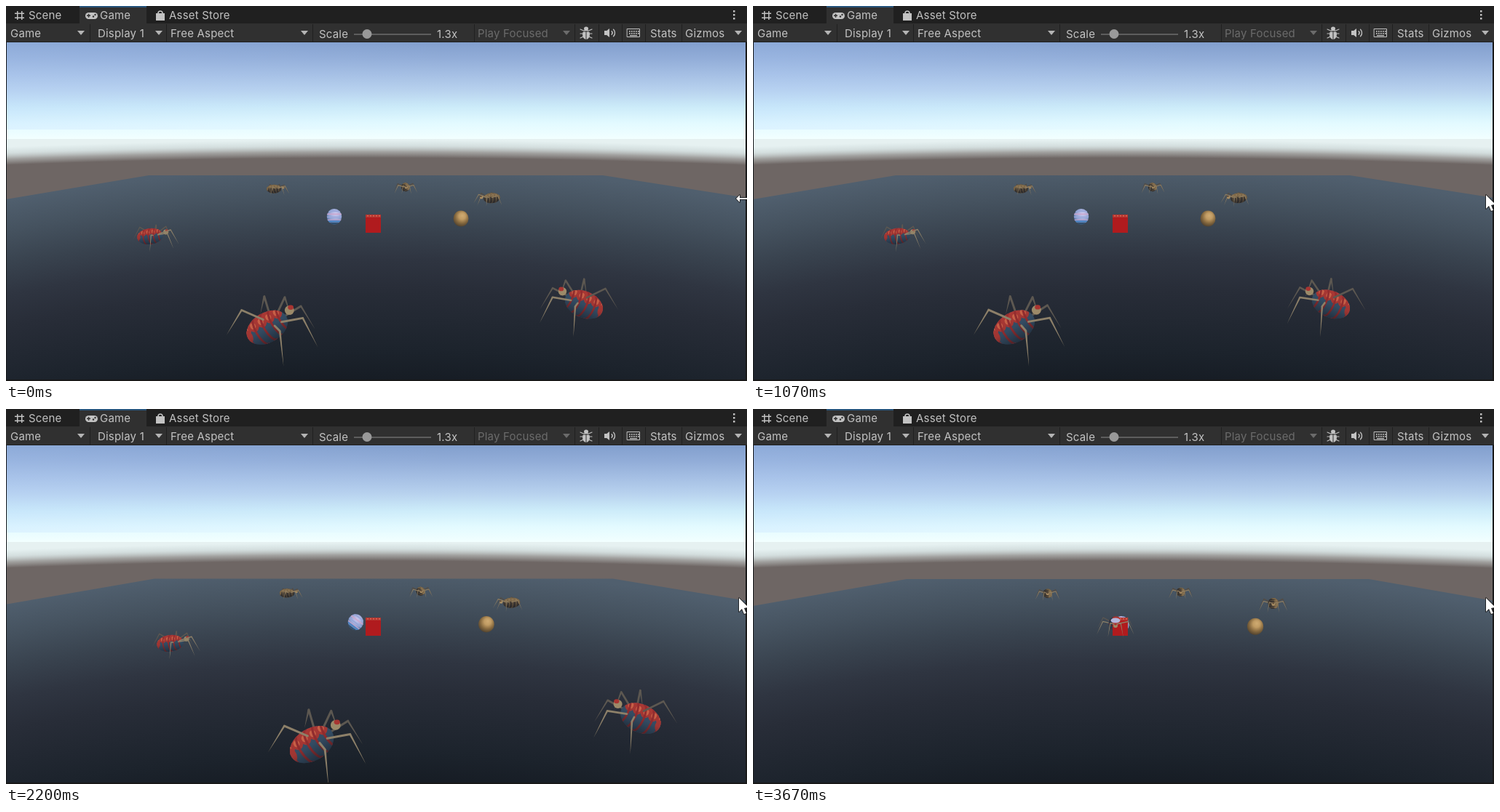
Animation of 1018x516 px, one loop 3.74 s. Source, as an HTML page with a canvas:

```html
<!DOCTYPE html>
<html lang="en">
<head>
<meta charset="utf-8">
<title>Game view</title>
<style>
html, body { margin: 0; width: 100%; height: 100%; overflow: hidden; background: #191919; }
canvas { display: block; }
</style>
</head>
<body>
<canvas id="stage" width="1018" height="516"></canvas>
<script>
const LOOP = 3740, STEP = 200 / 3, CUT = 2400, MIDDLE = 505, HORIZON = 175;
const INK = '#c2c2c2', DIM = '#6b6b6b', PANEL = '#303030', DARK = '#202020';
const { PI, sin, cos, hypot, atan2 } = Math;
const ctx = document.getElementById('stage').getContext('2d');

const lerp = (a, b, k) => a + (b - a) * k;
function ease(t, from, to) {
  const k = Math.min(1, Math.max(0, (t - from) / (to - from)));
  return k * k * (3 - 2 * k);
}

function rect(x, y, w, h, color) {
  ctx.fillStyle = color;
  ctx.fillRect(x, y, w, h);
}
function oval(x, y, rx, ry, color, turn = 0) {
  ctx.beginPath();
  ctx.ellipse(x, y, rx, ry, turn, 0, PI * 2);
  ctx.fillStyle = color;
  ctx.fill();
}
function arc(x, y, rx, ry, from, to, color, width) {
  ctx.beginPath();
  ctx.ellipse(x, y, rx, ry, 0, from, to);
  ctx.strokeStyle = color;
  ctx.lineWidth = width;
  ctx.stroke();
}
function trace(pts) {
  ctx.beginPath();
  for (const [x, y] of pts) ctx.lineTo(x, y);
}
function poly(pts, color) {
  trace(pts);
  ctx.closePath();
  ctx.fillStyle = color;
  ctx.fill();
}
function line(pts, color, width) {
  trace(pts);
  ctx.strokeStyle = color;
  ctx.lineWidth = width;
  ctx.stroke();
}
function fill(gradient, colors) {
  colors.forEach((c, i) => gradient.addColorStop(i / (colors.length - 1), c));
  return gradient;
}
// Evenly spaced colours from top to bottom, along wide arcs.
function arcs(radius, top, bottom, colors) {
  const cy = bottom + radius;
  return fill(ctx.createRadialGradient(MIDDLE, cy, cy - top, MIDDLE, cy, radius), colors);
}

const sky = fill(ctx.createLinearGradient(0, 50, 0, 183),
  ['#829fcd', '#92add8', '#a5bfe4', '#b8d2ee', '#ccebf9', '#e2faff', '#f2ffff']);
const glow = fill(ctx.createLinearGradient(0, 50, 600, 120), ['rgba(180,210,255,.22)', 'rgba(180,210,255,0)']);
const haze = arcs(13000, 184, 209, ['rgba(190,205,206,0)', 'rgba(190,200,200,.45)', 'rgba(150,148,146,.85)', '#6e6664']);
const ground = arcs(2400, 220, 516, ['#505f6e', '#45525f', '#39434f', '#2f3541', '#282d38', '#222832', '#1c232c', '#161c24']);

const RED = { base: '#365068', band: '#962d2f', back: '#aa3834', shine: '#cd6248', leg: '#8d8069', dim: '#5d5851', head: '#9c8a69', face: '#a83531' };
const TAN = { base: '#413a34', band: '#806b4c', back: '#7d6849', shine: '#a08560', leg: '#8f7d60', dim: '#554c42', head: '#a88d63', face: '#5a4838' };

// Ground point and heading; size and tilt follow from the distance to the horizon.
const far = [[371, 258, -.15], [549, 256, 1.5], [664, 272, 2.8]];
const near = [[203, 328, -.4], [787, 427, 3.85], [366, 460, -.8]];

// Camera slide: things low on the stage move furthest.
function place(x, y, move) {
  const u = y - HORIZON;
  return [x + move * u * (.46 + .0004 * (x - MIDDLE)), y + move * u * u * .00045];
}

function drawBody(x, y, rx, ry, turn, skin) {
  ctx.save();
  ctx.translate(x, y);
  // Keep the back upward when the body points left.
  const flip = cos(turn) < 0 ? -1 : 1;
  ctx.scale(flip, 1);
  ctx.rotate(atan2(sin(turn), cos(turn) * flip));
  oval(0, 0, rx, ry, skin.base);
  ctx.clip();
  for (let i = 2; i >= -2; i--) {
    const cx = i * rx * .4;
    oval(cx - rx * .1, -ry * .62, rx * .25, ry * .5, skin.back);
    oval(cx - rx * .13, -ry * .55, rx * .13, ry * .22, skin.shine);
    arc(cx + rx * .1, 0, rx * .24, ry, PI / 2, PI * 1.5, skin.band, rx * .1);
  }
  oval(-rx, -ry * .1, rx * .25, ry * .5, skin.back);
  const shade = fill(ctx.createLinearGradient(0, -ry, 0, ry), ['rgba(18,22,30,0)', 'rgba(18,22,30,.08)', 'rgba(18,22,30,.55)']);
  rect(-rx, -ry, rx * 2, ry * 2, shade);
  ctx.restore();
}

function drawSpider(x, y, heading, skin, t, inside) {
  const size = .226 * (y - HORIZON), tilt = (y - HORIZON) / 500;
  const breath = .01 * sin(t / 420), width = Math.max(1.2, size * .045);
  // Point at an angle, radius and height around the spider.
  const point = (a, r, z) => [x + size * r * cos(a), y + size * (r * sin(a) * tilt - z)];
  const drawLeg = a => {
    const knee = point(a, .67, .57 + breath), foot = point(a, 1, 0);
    const color = sin(a) < -.2 ? skin.dim : skin.leg;
    line([point(a, .2, .42 + breath), knee], color, width);
    poly([[knee[0] - width / 2, knee[1]], [knee[0] + width / 2, knee[1]], foot], color);
  };
  const drawHead = () => {
    const [hx, hy] = point(heading, .52, .43 + breath), r = size * .1;
    oval(hx, hy, r, r, skin.head);
    oval(hx + r * .4 * cos(heading), hy - r * .6, r * .6, r * .5, skin.face);
  };
  const legs = [.35, 1.05, 2.15].flatMap((a, i) => [-1, 1].map(side =>
    heading + side * a + .02 * sin(t / 300 + i * 2 + side))).sort((a, b) => sin(a) - sin(b));
  const away = sin(heading) < .2;

  ctx.lineCap = ctx.lineJoin = 'round';
  legs.slice(0, 3).forEach(drawLeg);
  if (away) drawHead();
  const ax = cos(heading), ay = sin(heading) * tilt;
  const long = size * Math.sqrt(.1 + .19 * (ax * ax + ay * ay));
  drawBody(...point(heading, -.16, .34 + breath), long, size * .32, atan2(ay, ax), skin);
  if (inside) inside();
  legs.slice(3).forEach(drawLeg);
  if (!away) drawHead();
}

function ball(x, y, colors, roll) {
  const r = .082 * (y - HORIZON), cy = y - r;
  ctx.save();
  ctx.translate(x, cy);
  oval(0, 0, r, r * 1.04, fill(ctx.createRadialGradient(r * .2, -r * .4, 0, r * .1, -r * .2, r * 1.3), colors));
  ctx.clip();
  if (roll !== undefined) {
    ctx.rotate(roll);
    for (let i = -2; i < 2; i++) rect(-r, i * r * .4, r * 2, r * .14, i % 2 ? '#cfa5cb' : '#95a6db');
    rect(-r, r * .5, r * 2, r * .25, '#4f85c2');
    rect(-r, r * .8, r * 2, r * .4, '#30506f');
  }
  ctx.restore();
}

function cube() {
  rect(494, 287, 21, 25, '#b01b1e');
  rect(494, 287, 21, 4, '#b7352f');
  for (let x = 496; x < 514; x += 4) rect(x, 288, 2, 1.5, '#cf6a58');
}

function scene(t) {
  const move = ease(t, 1450, 2880), turn = ease(t, 2200, 3100);
  const at = (a, b) => lerp(a, b, move);
  const spider = ([x, y, heading], skin) => drawSpider(...place(x, y, move), lerp(heading, PI / 2, turn), skin, t);

  rect(0, 50, 1018, 140, sky);
  rect(0, 183, 1018, 60, '#e6f1f1');
  rect(0, 50, 1018, 120, glow);
  rect(0, 180, 1018, 100, haze);
  poly([[0, at(266, 271)], [at(196, 211), at(233, 234)], [at(820, 846), at(233, 234)],
    [1018, 264], [1018, 516], [0, 516]], ground);

  far.forEach(s => spider(s, TAN));
  ball(...place(625, 303, move), ['#cfab72', '#c09b63', '#86693f', '#4c3f2e']);
  ball(...place(451, 300, move), ['#c9c7ec', '#b3b7e2', '#8fa0cf', '#4a6a98'], move * 1.2);
  if (t < CUT) {
    cube();
    near.forEach(s => spider(s, RED));
  } else {
    const spin = ease(t, CUT, 3500);
    drawSpider(lerp(494, 498, spin), 307, spin * PI / 2, RED, t, () => {
      cube();
      oval(lerp(491, 498, spin), 291, 6.5, 3.5, '#b4b6dc');
    });
  }
  rect(0, 50, 1, 466, '#17191c');
  rect(1016, 50, 2, 466, '#191919');
  rect(0, 514, 1018, 2, '#191919');
}

function text(str, x, y, color = INK) {
  ctx.font = '15px Inter, "Open Sans", sans-serif';
  ctx.letterSpacing = '.2px';
  ctx.fillStyle = color;
  ctx.fillText(str, x, y);
}
const drop = (x, color = '#b4b4b4') => poly([[x - 5, 34], [x + 5, 34], [x, 40]], color);

function tabs() {
  rect(0, 0, 1018, 24, DARK);
  rect(101, 0, 92, 24, PANEL);
  rect(101, 0, 92, 2, '#2a567d');
  text('Scene', 31, 18);
  text('Game', 129, 18);
  text('Asset Store', 224, 18);
  for (const y of [6, 11, 16]) rect(999, y, 2.5, 2.5, INK);
  // Grid, gamepad, bag
  for (const d of [0, 6]) {
    rect(15 + d, 7, 1.5, 12, INK);
    rect(12, 9.5 + d, 13, 1.5, INK);
  }
  line([[113.5, 13.5], [121.5, 13.5]], INK, 9);
  rect(111, 12.5, 5, 1.5, PANEL);
  rect(112.8, 10.8, 1.5, 5, PANEL);
  for (const d of [0, 2.5]) oval(120 + d, 14.5 - d, 1.2, 1.2, PANEL);
  rect(206, 10, 12, 10, INK);
  arc(212, 10, 3, 3, PI, PI * 2, INK, 1.6);
}

function toolbar() {
  rect(0, 24, 1018, 26, PANEL);
  rect(0, 49, 1018, 1, DARK);
  for (const x of [115, 220, 421, 643, 781, 814, 846, 878, 928]) rect(x, 25, 1, 24, DARK);
  text('Game', 6, 43);
  text('Display 1', 126, 43);
  text('Free Aspect', 226, 43);
  text('Scale', 430, 44);
  text('1.3x', 592, 44);
  text('Play Focused', 648, 43, DIM);
  text('Stats', 885, 43);
  text('Gizmos', 933, 43);
  for (const x of [103, 210, 410, 1006]) drop(x);
  drop(770, DIM);
  rect(478, 38, 106, 2, '#5e5e5e');
  oval(496, 38.5, 6.5, 6.5, '#999');
  // Bug, speaker, keyboard
  for (const d of [-5, 0, 5]) line([[789, 38 + d * 1.2], [797, 38 + d * .5], [805, 38 + d * 1.2]], INK, 1.2);
  oval(797, 39, 5, 7, INK);
  oval(797, 31, 3, 2.5, INK);
  rect(796.5, 34, 1, 12, PANEL);
  rect(792, 34.5, 10, 1, PANEL);
  rect(822, 34, 4, 6, INK);
  poly([[824, 35], [829, 31], [829, 43], [824, 39]], INK);
  for (const r of [3, 6.5]) arc(830, 37, r, r, -.8, .8, INK, 1.4);
  ctx.lineWidth = 1;
  ctx.strokeRect(853.5, 31.5, 17, 11);
  for (let x = 856; x < 869; x += 3) for (const y of [34, 37]) rect(x, y, 1.7, 1.7, INK);
  rect(857, 40, 10, 1.3, INK);
}

function cursor(t) {
  const shape = t < 870
    ? [[1003, 265], [1008, 260], [1008, 264], [1018, 264], [1018, 266], [1008, 266], [1008, 270]]
    : [[1007, 260], [1007, 279], [1011, 275], [1014, 282], [1017, 281], [1014, 274], [1020, 273]];
  line([...shape, shape[0]], '#111', 1.5);
  poly(shape, '#fff');
}

function frame() {
  const now = performance.now() % LOOP;
  const t = Math.floor((now + 5) / STEP) * STEP % LOOP;
  scene(t);
  tabs();
  toolbar();
  cursor(t);
  requestAnimationFrame(frame);
}
frame();
</script>
</body>
</html>
```
